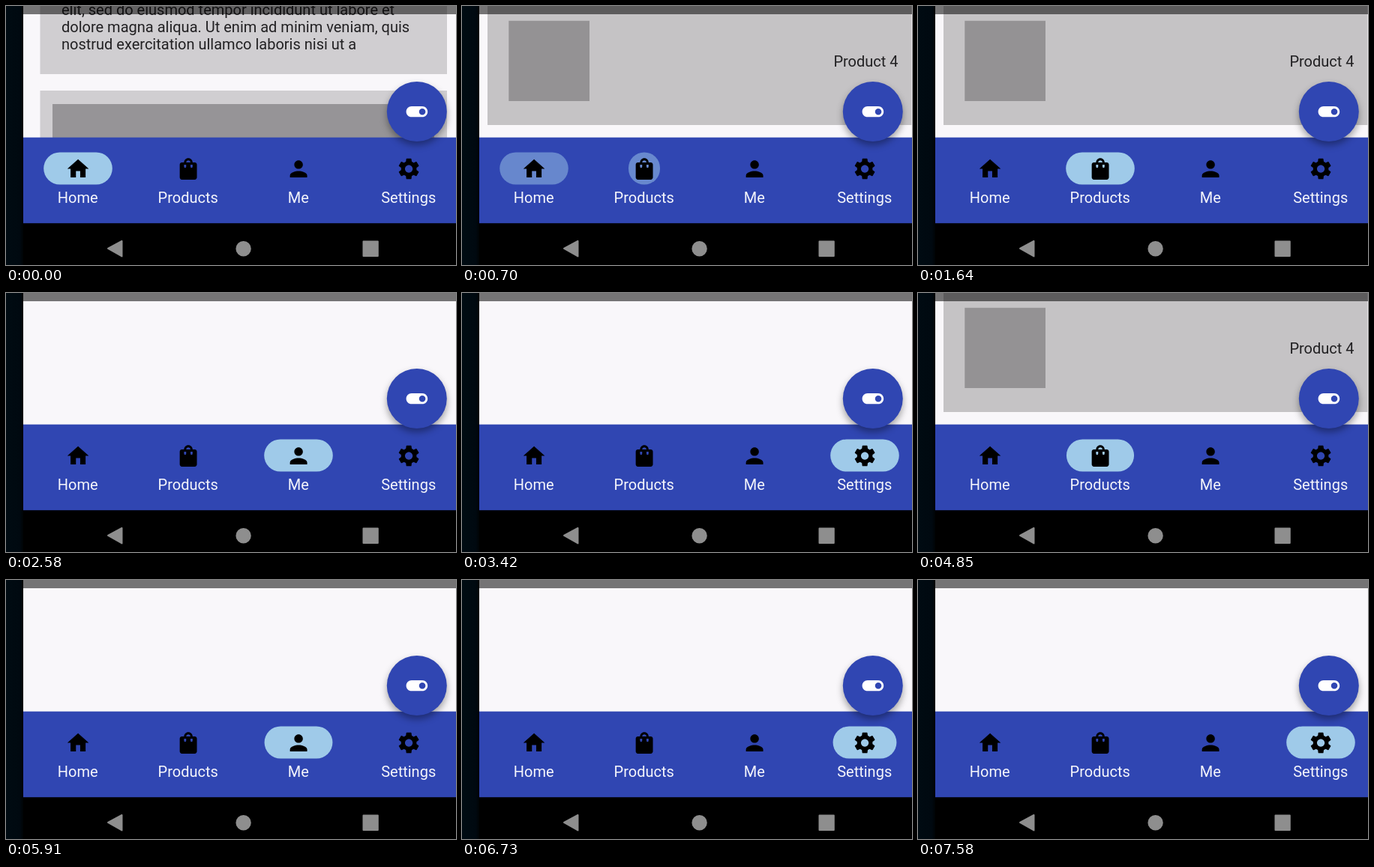
Write an HTML page that moves like this. It is 600 by 346 pixels and loops after 7.61 s.

```html
<!DOCTYPE html>
<html lang="en">
<head>
<meta charset="utf-8">
<title>Bottom navigation</title>
<style>
  html, body { margin: 0; width: 100%; height: 100%; overflow: hidden; background: #000; }
  svg { display: block; width: 600px; height: 346px; }
  text { font: 20px Roboto, Arial, sans-serif; fill: #222123; }
  .label { fill: #f4f5fb; text-anchor: middle; }
  .pill { fill: #9fcae9; }
  .fab { filter: drop-shadow(0 5px 5px rgba(0, 0, 0, .36)); }
</style>
</head>
<body>
<svg viewBox="0 0 600 346" xmlns="http://www.w3.org/2000/svg">
  <defs>
    <linearGradient id="edge">
      <stop offset="0" stop-color="#000b12"/>
      <stop offset=".8" stop-color="#000910"/>
      <stop offset="1" stop-color="#000305"/>
    </linearGradient>
  </defs>

  <rect width="600" height="346"/>
  <rect width="23" height="346" fill="url(#edge)"/>
  <rect x="23" width="577" height="176" fill="#f9f7fa"/>

  <g class="page">
    <path d="M45.5 0H588V91H45.5zM45.5 113H588V176H45.5z" fill="#d0ced1"/>
    <path d="M62 131H571V176H62z" fill="#969497"/>
    <text x="74" y="12">elit, sed do eiusmod tempor incididunt ut labore et</text>
    <text x="74" y="35">dolore magna aliqua. Ut enim ad minim veniam, quis</text>
    <text x="74" y="58">nostrud exercitation ullamco laboris nisi ut a</text>
  </g>
  <g class="page">
    <path d="M34 0H599.3V159H34z" fill="#c5c3c5"/>
    <path d="M62.3 19.7H170V127H62.3z" fill="#949294"/>
    <text x="581.5" y="81" text-anchor="end">Product 4</text>
  </g>

  <rect x="23" width="577" height="11" fill="#000" opacity=".53"/>
  <rect x="23" y="175.6" width="577" height="114.6" fill="#3046b2"/>
  <g id="tabs"></g>

  <g class="fab"><circle cx="547.8" cy="141" r="40" fill="#3046b2"/></g>
  <path transform="translate(547.9 141.2) scale(1.43) translate(-12 -12)" fill="#fff"
    d="M17 7H7c-2.76 0-5 2.24-5 5s2.24 5 5 5h10c2.76 0 5-2.24 5-5s-2.24-5-5-5zm0 8c-1.66 0-3-1.34-3-3s1.34-3 3-3 3 1.34 3 3-1.34 3-3 3z"/>

  <g fill="#8e8e8e" stroke="#8e8e8e" stroke-width="2" stroke-linejoin="round">
    <path d="M136 324L154.5 314V334.5z"/>
    <circle cx="316.6" cy="324.2" r="9.2"/>
    <path d="M476.5 314.5H495.8V334H476.5z"/>
  </g>
</svg>

<script>
const LOOP = 7610, GROW = 500, FADE = 100;

const tabs = [
  ['Home', 'M10 20v-6h4v6h5v-8h3L12 3 2 12h3v8z'],
  ['Products', 'M18 6h-2c0-2.21-1.79-4-4-4S8 3.79 8 6H6c-1.1 0-2 .9-2 2v12c0 1.1.9 2 2 2h12c1.1 0 2-.9 2-2V8c0-1.1-.9-2-2-2zm-8 4c0 .55-.45 1-1 1s-1-.45-1-1V8h2v2zm2-6c1.1 0 2 .9 2 2h-4c0-1.1.9-2 2-2zm4 6c0 .55-.45 1-1 1s-1-.45-1-1V8h2v2z'],
  ['Me', 'M12 12c2.21 0 4-1.79 4-4s-1.79-4-4-4-4 1.79-4 4 1.79 4 4 4zm0 2c-2.67 0-8 1.34-8 4v2h16v-2c0-2.66-5.33-4-8-4z'],
  ['Settings', 'M19.14 12.94c.04-.3.06-.61.06-.94 0-.32-.02-.64-.07-.94l2.03-1.58c.18-.14.23-.41.12-.61l-1.92-3.32c-.12-.22-.37-.29-.59-.22l-2.39.96c-.5-.38-1.03-.7-1.62-.94l-.36-2.54c-.04-.24-.24-.41-.48-.41h-3.84c-.24 0-.43.17-.47.41l-.36 2.54c-.59.24-1.13.57-1.62.94l-2.39-.96c-.22-.08-.47 0-.59.22L2.74 8.87c-.12.21-.08.47.12.61l2.03 1.58c-.05.3-.09.63-.09.94s.02.64.07.94l-2.03 1.58c-.18.14-.23.41-.12.61l1.92 3.32c.12.22.37.29.59.22l2.39-.96c.5.38 1.03.7 1.62.94l.36 2.54c.05.24.24.41.48.41h3.84c.24 0 .44-.17.47-.41l.36-2.54c.59-.24 1.13-.56 1.62-.94l2.39.96c.22.08.47 0 .59-.22l1.92-3.32c.12-.22.07-.47-.12-.61l-2.01-1.58zM12 15.6c-1.98 0-3.6-1.62-3.6-3.6s1.62-3.6 3.6-3.6 3.6 1.62 3.6 3.6-1.62 3.6-3.6 3.6z']
];

// [start time, tab index]
const visits = [[-GROW, 0], [650, 1], [1680, 2], [2620, 3], [3560, 0], [4550, 1], [5560, 2], [6560, 3]];

const centre = i => 96 + i * 147;

document.getElementById('tabs').innerHTML = tabs.map(([name, icon], i) => `
  <g transform="translate(${centre(i)} 217)">
    <rect class="pill" x="-45.8" y="-21.6" width="91.6" height="43.2" rx="21.6"/>
    <path d="${icon}" transform="translate(.1 .6) scale(1.43) translate(-12 -12)"/>
    <text class="label" x="-.3" y="46.2">${name}</text>
  </g>`).join('');

const pills = document.querySelectorAll('.pill');
const pages = document.querySelectorAll('.page');

const clamp = v => Math.min(1, Math.max(0, v));

function bezier(x, x1, y1, x2, y2) {
  const at = (s, a, b) => 3 * s * (1 - s) * ((1 - s) * a + s * b) + s ** 3;
  let lo = 0, hi = 1;
  for (let i = 0; i < 24; i++) {
    const mid = (lo + hi) / 2;
    if (at(mid, x1, x2) < x) lo = mid; else hi = mid;
  }
  return at(lo, y1, y2);
}

// Slow start, quick middle, long settling tail
function emphasized(t) {
  if (t <= 0 || t >= 1) return clamp(t);
  const knee = 1 / 6;
  return t < knee
    ? .4 * bezier(t / knee, .3, 0, .8, .15)
    : .4 + .6 * bezier((t - knee) / (1 - knee), .05, .7, .1, 1);
}

function setPill(i, progress, opacity) {
  const width = 91.6 * (.4 + .6 * emphasized(progress));
  const pill = pills[i];
  pill.setAttribute('x', -width / 2);
  pill.setAttribute('width', width);
  pill.setAttribute('rx', Math.min(21.6, width / 2));
  pill.setAttribute('opacity', opacity);
}

function draw(time) {
  const now = time % LOOP;
  const n = visits.findLastIndex(([start]) => start <= now);
  const [start, tab] = visits[n];
  const age = now - start;

  pills.forEach((_, i) => setPill(i, 0, 0));
  if (n > 0) setPill(visits[n - 1][1], 1 - clamp(age / GROW), 1 - clamp(age / FADE));
  setPill(tab, clamp(age / GROW), clamp(age / FADE));
  pages.forEach((page, i) => page.setAttribute('visibility', i === tab ? 'visible' : 'hidden'));
}

const began = performance.now();
function tick() {
  draw(performance.now() - began);
  requestAnimationFrame(tick);
}
tick();
</script>
</body>
</html>
```
